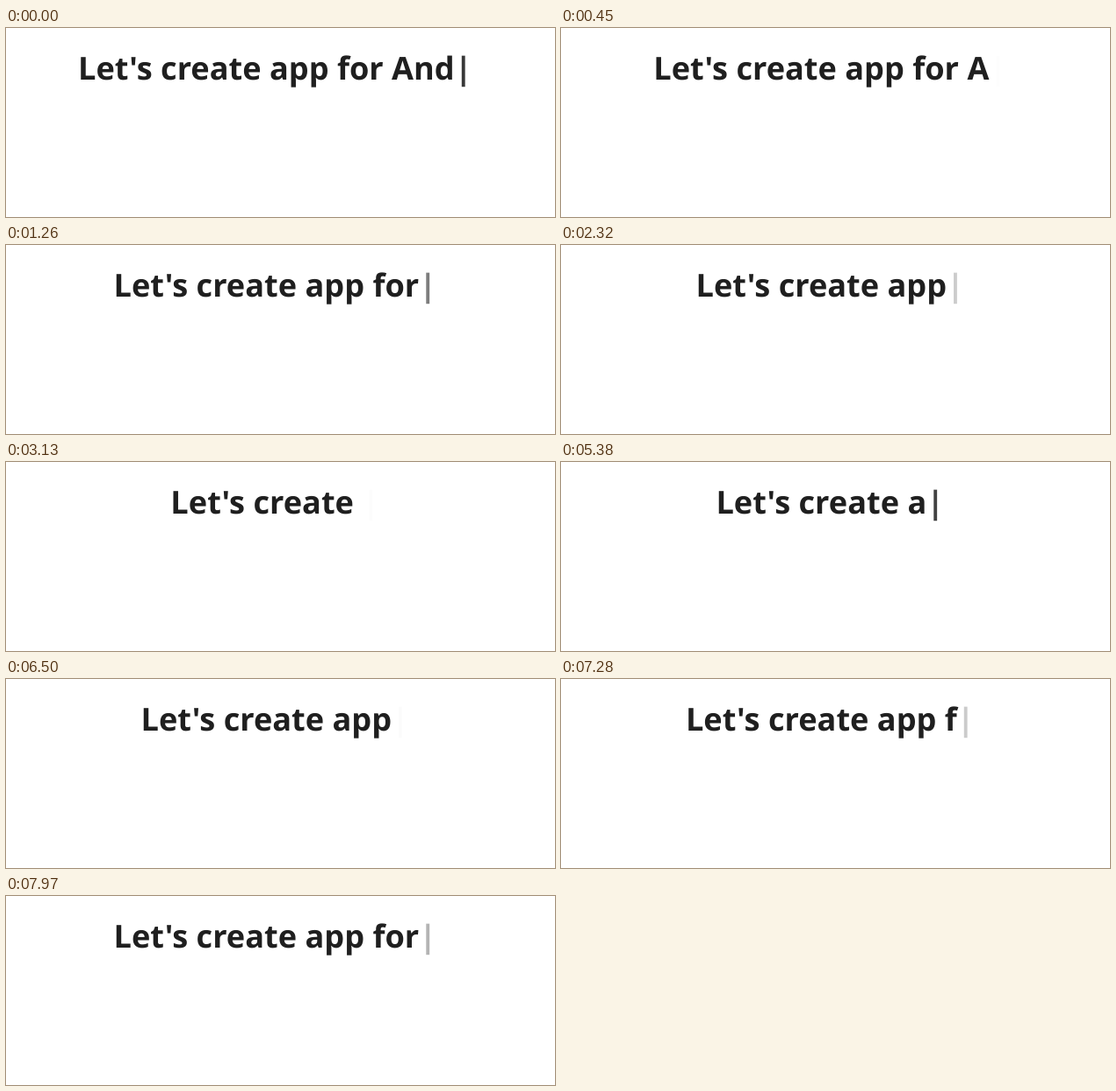
These frames come from a looping animation (625x216 px, 8 s). An HTML page:

```html
<!DOCTYPE html>
<html lang="en">
<head>
<meta charset="utf-8">
<title>Typing headline</title>
<style>
  html, body { margin: 0; width: 100%; height: 100%; overflow: hidden; background: #fff; }
  h1 {
    position: absolute; left: 0; top: 21px; width: 612.6px; margin: 0;
    font: 700 36.15px/49px "Open Sans", "Noto Sans", sans-serif;
    color: #1f1f1f; text-align: center; white-space: pre;
    text-rendering: geometricPrecision;
  }
</style>
</head>
<body>
<h1><span id="text">Let's create app for And</span><span id="cursor">|</span></h1>
<script>
  const LOOP = 8000, BLINK = 675, PHASE = 0.8;
  const FULL = "Let's create app for And";
  const text = document.getElementById("text");
  const cursor = document.getElementById("cursor");

  // Words are erased one by one, then typed again at a steady pace
  const strokes = [
    { at: 150, every: 190, count: 4, by: -1 },
    { at: 1380, every: 190, count: 4, by: -1 },
    { at: 2450, every: 190, count: 3, by: -1 },
    { at: 5240, every: 450, count: 7, by: 1 }
  ];

  const clamp = (x, lo, hi) => Math.min(hi, Math.max(lo, x));

  function textLength(t) {
    return strokes.reduce((sum, { at, every, count, by }) =>
      sum + by * clamp(Math.floor((t - at) / every) + 1, 0, count), FULL.length);
  }

  // CSS "ease": cubic-bezier(.25, .1, .25, 1)
  function ease(x) {
    let lo = 0, hi = 1, s = 0.5;
    for (let i = 0; i < 20; i++) {
      s = (lo + hi) / 2;
      const bx = 0.75 * s * (1 - s) + s ** 3;
      if (bx < x) lo = s; else hi = s;
    }
    return 0.3 * s * (1 - s) ** 2 + 3 * s * s * (1 - s) + s ** 3;
  }

  function blink(t) {
    const u = (t / BLINK + PHASE) % 1;
    return u < 0.5 ? 1 - ease(u * 2) : ease(u * 2 - 1);
  }

  function draw(t) {
    text.textContent = FULL.slice(0, textLength(t));
    cursor.style.opacity = blink(t).toFixed(3);
  }

  let start;
  function frame(now) {
    start ??= now;
    draw((now - start) % LOOP);
    requestAnimationFrame(frame);
  }
  draw(0);
  requestAnimationFrame(frame);
</script>
</body>
</html>
```
